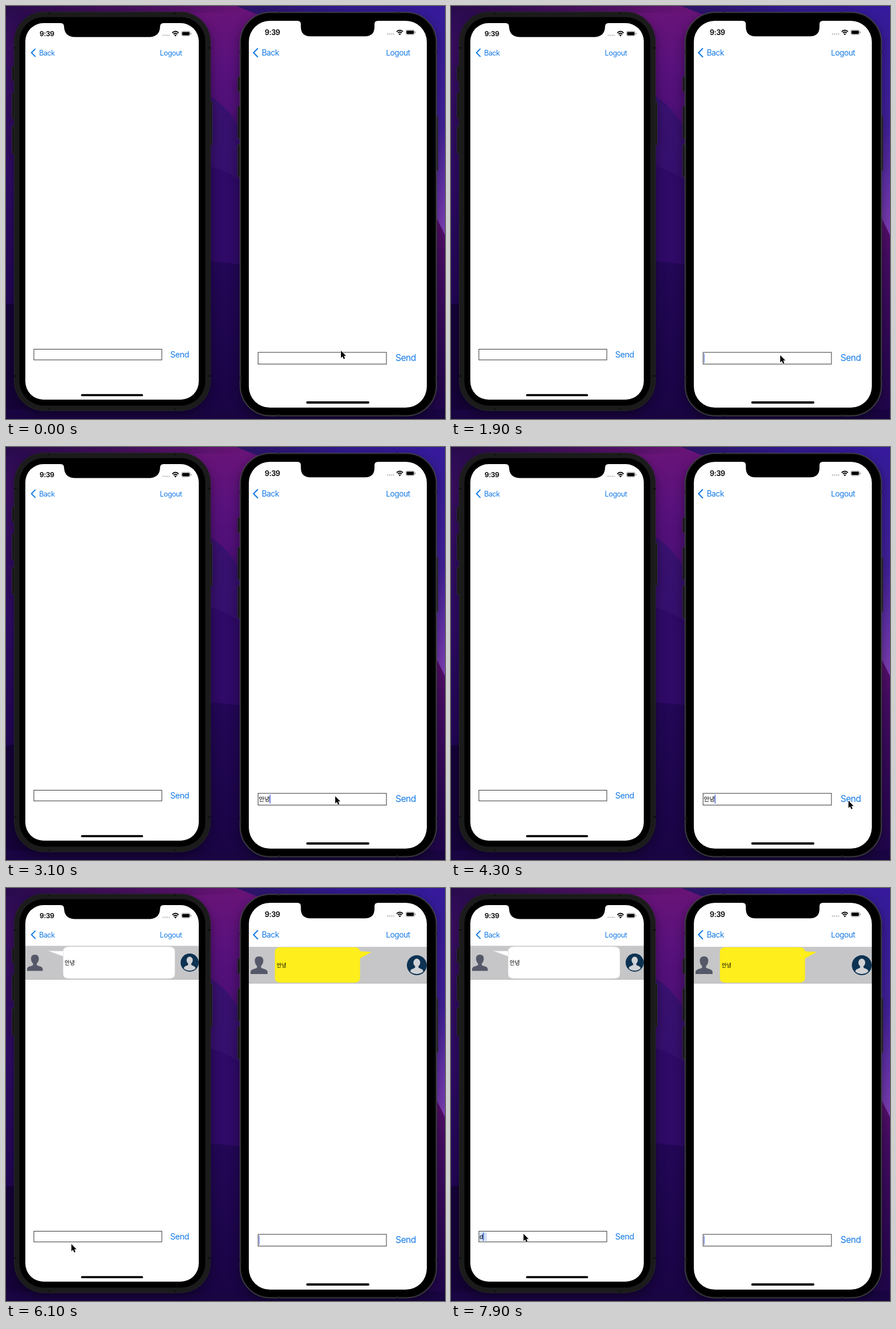
Recreate the animation shown at these times as an HTML page. Size 772 px wide and 725 px high, loop 8000 ms.

```html
<!DOCTYPE html>
<html lang="ko">
<head>
<meta charset="utf-8">
<style>
html, body { margin: 0; width: 100%; height: 100%; overflow: hidden; background: #1c0648; }
svg { display: block; }
text { font-family: Inter, "Noto Sans CJK KR", "Noto Sans CJK", sans-serif; }
.link { fill: #147ae6; letter-spacing: -.035em; }
.time { font-weight: 600; letter-spacing: -.03em; }
.ko { font-family: "Noto Sans CJK KR", "Noto Sans CJK", sans-serif; }
.body { filter: drop-shadow(0 6px 9px rgba(0, 0, 0, .4)); }
</style>
</head>
<body>
<svg id="stage" width="772" height="725" viewBox="0 0 772 725"></svg>
<script>
const stage = document.getElementById('stage');

const gradient = (id, stops, dir = 'x2="0" y2="1"') =>
  `<linearGradient id="${id}" ${dir}>${stops.map(([o, c]) =>
    `<stop offset="${o}" stop-color="${c}"/>`).join('')}</linearGradient>`;

const rect = (x, y, w, h, r, fill, extra = '') =>
  `<rect x="${x}" y="${y}" width="${w}" height="${h}" rx="${r}" fill="${fill}" ${extra}/>`;

const text = (x, y, size, str, cls, extra = '') =>
  `<text x="${x}" y="${y}" font-size="${size}" class="${cls}" ${extra}>${str}</text>`;

const wallpaper = () => `
  <defs>
    ${gradient('edge', [[0, '#290b4e'], [.1, '#3a0e62'], [.42, '#2e0b66'], [.72, '#220655'], [1, '#150438']])}
    ${gradient('mid', [[0, '#6a1478'], [.15, '#58117c'], [.3, '#4a0f74'], [1, '#3a0c60']])}
    ${gradient('low', [[0, '#391270'], [1, '#2b0866']])}
    ${gradient('deep', [[0, '#230757'], [1, '#190444']])}
    ${gradient('blue', [[0, '#341a98'], [.5, '#40209a'], [1, '#8040b4']])}
    ${gradient('wine', [[0, '#641170'], [.25, '#460c64'], [1, '#1e054a']])}
    ${gradient('top', [[0, '#290b4c'], [.5, '#45105c'], [1, '#681476']], '')}
    ${gradient('topBlue', [[0, '#2b1464'], [.5, '#321a8e'], [1, '#361a9c']], '')}
  </defs>
  ${rect(0, 0, 200, 725, 0, 'url(#edge)')}
  <path d="M0 524L60 518V725H0Z" fill="#150339"/>
  ${rect(200, 0, 300, 725, 0, 'url(#mid)')}
  <path d="M200 150H340Q385 165 412 218H500V725H200Z" fill="url(#low)"/>
  <path d="M340 278Q385 284 412 308V456L340 446Z" fill="#2f0a67"/>
  <path d="M200 440L360 448L500 462V725H200Z" fill="url(#deep)"/>
  ${rect(600, 0, 172, 410, 0, 'url(#blue)')}
  <path d="M740 338L772 402V725H600V338Z" fill="url(#wine)"/>
  ${rect(0, 0, 420, 12, 0, 'url(#top)')}
  <path d="M405 0H772V14H440Z" fill="url(#topBlue)"/>
  ${rect(0, 708, 772, 17, 0, '#190542')}`;

const notch = (x1, x2, y, depth, r) => `<path d="M${x1 - 6} ${y - 1}V${y}Q${x1} ${y} ${x1} ${y + 6}
  V${y + depth - r}Q${x1} ${y + depth} ${x1 + r} ${y + depth}H${x2 - r}
  Q${x2} ${y + depth} ${x2} ${y + depth - r}V${y + 6}Q${x2} ${y} ${x2 + 6} ${y}V${y - 1}Z"/>`;

const statusIcons = (x, y) => `<g transform="translate(${x} ${y})">
  ${[1.5, 5, 8.5, 12].map(cx => `<circle cx="${cx}" cy="7.5" r="1.3" fill="#c4c4c6"/>`).join('')}
  <g fill="none" stroke="#000" stroke-width="1.9">
    <path d="M17.5 3.2Q23 -2 28.5 3.2M19.6 5.5Q23 2.4 26.4 5.5"/></g>
  <path d="M20.9 7.2Q23 5.5 25.1 7.2L23 9.4Z"/>
  ${rect(33.5, .2, 15.5, 8.4, 2.4, 'none', 'stroke="#999" stroke-width=".8"')}
  ${rect(34.7, 1.4, 13.1, 6, 1.4, '#000')}
  ${rect(50, 3, 1, 3, .5, '#888')}</g>`;

const person = (x, y, s) => `<g transform="translate(${x} ${y}) scale(${s})" fill="#545868">
  <path d="M14.5 0Q22 0 22 8Q21.5 14 18 17V19.5Q19 21 24 22.2Q29.5 23.6 29.5 28V31H-.5V28
  Q-.5 23.6 5 22.2Q10 21 11 19.5V17Q7.5 14 7 8Q7 0 14.5 0Z"/></g>`;

const badge = (x, y, s) => `<g transform="translate(${x} ${y}) scale(${s})">
  <circle r="17.5" fill="#0d3252"/>
  <g fill="#d0d2d6"><ellipse cy="-4.5" rx="6" ry="7"/>
  <path d="M-3 1H3V4Q4 5.3 7 6.2Q11 7.5 11.5 11Q7 15.3 0 15.3T-11.5 11Q-11 7.5 -7 6.2Q-4 5.3 -3 4Z"/></g></g>`;

const bubble = (x, y, w, h, tail, fill, line) =>
  `<g fill="${fill}" stroke="${line}" stroke-width=".8"><path d="${tail}"/>
  <path d="M${x + 11} ${y}H${x + w - 11}Q${x + w} ${y} ${x + w} ${y + 8}V${y + h - 8}
  Q${x + w} ${y + h} ${x + w - 11} ${y + h}H${x + 11}Q${x} ${y + h} ${x} ${y + h - 8}V${y + 8}
  Q${x} ${y} ${x + 11} ${y}Z"/></g>`;

const row = (x, y, w, h) =>
  rect(x, y, w, h, 0, '#c6c6c8') + rect(x, y + h - .8, w, .8, 0, '#b4b4b6');

const chevron = (x, y, s) => `<path d="M${x + 6.5 * s} ${y - 6.6 * s}L${x} ${y}l${6.5 * s} ${6.6 * s}"
  fill="none" stroke="#147ae6" stroke-width="${1.9 * s}" stroke-linecap="round" stroke-linejoin="round"/>`;

const keys = (x, list) => list.map(([y, h]) =>
  rect(x, y, 6, h, 1.5, '#161616', 'stroke="#343436" stroke-width=".8"')).join('');

const leftPhone = () => `
  <g class="body">${keys(10.5, [[105, 26], [152, 46], [211, 48]])}${keys(356.5, [[168, 76]])}
  ${rect(14.5, 10.5, 345, 700, 52, '#1b1b1b', 'stroke="#252527"')}</g>
  ${[72, 648].map(y => rect(14, y, 5, 3, 0, '#111') + rect(355, y, 5, 3, 0, '#111')).join('')}
  ${[[75, 11], [295, 11], [75, 706], [295, 706]].map(p => rect(p[0], p[1], 3, 4, 0, '#111')).join('')}
  ${rect(23.5, 19.5, 327, 682, 43, '#000')}
  ${rect(34, 30, 305, 661, 32, '#fff')}
  ${notch(102, 271, 30, 24.5, 20)}
  ${text(59, 52.8, 12.2, '9:39', 'time')}${statusIcons(275, 44)}
  ${chevron(44.8, 82, 1)}
  ${text(58.2, 86.6, 12.6, 'Back', 'link')}${text(270.6, 86.6, 12.6, 'Logout', 'link')}
  <g id="rowL">${row(34, 101.5, 305, 59.2)}${person(37.5, 117, .92)}${badge(323, 131, .91)}
    ${bubble(100.5, 103, 196.5, 56, 'M74 110.3Q88 111 102 110.5V120.5Z', '#fff', '#dcdcde')}
    ${text(103, 134.8, 9.9, '안녕', 'ko')}</g>
  ${rect(49, 602.5, 225, 18.7, 0, '#fff', 'stroke="#333"')}
  ${text(288.8, 616.7, 14.5, 'Send', 'link')}
  <g id="mark">${rect(50, 604.5, 13, 15, 0, '#cfe0f5')}${text(50, 616, 10.8, 'd', '')}</g>
  <rect id="caretL" y="604.5" width="1.4" height="15" fill="#3d5fd8"/>
  ${rect(132, 681.3, 109, 3.8, 1.9, '#000')}`;

const rightPhone = () => `
  <g class="body">${keys(407.5, [[124, 26], [176, 57], [243, 57]])}${keys(753.5, [[194, 95]])}
  ${rect(411.7, 11, 345.3, 708.5, 53, '#0c0c0d', 'stroke="#434346" stroke-width="1.6"')}</g>
  ${[78, 650].map(y => rect(411, y, 3, 4, 0, '#222') + rect(754.5, y, 3, 4, 0, '#222')).join('')}
  ${[[478, 10.3], [686, 10.3], [478, 717], [686, 717]].map(p => rect(p[0], p[1], 4, 3, 0, '#222')).join('')}
  ${rect(414.5, 13.5, 339.5, 703.5, 50, '#000')}
  ${rect(427, 26, 313, 679, 37, '#fff')}
  ${notch(518.5, 648, 26, 27.3, 17)}
  ${text(455, 50.8, 12.7, '9:39', 'time')}${statusIcons(669.5, 41.8)}
  ${chevron(435.3, 82, 1.1)}
  ${text(449.8, 87, 13.8, 'Back', 'link')}${text(668.3, 87, 13.7, 'Logout', 'link')}
  <g id="rowR">${row(427, 103.3, 313, 64.2)}${person(430.5, 120, 1)}${badge(722.4, 135.6, 1)}
    ${bubble(472.8, 104, 149.8, 62.3, 'M643 112.2Q632 112 621 111V124.5Z', '#fdee1c', 'none')}
    ${text(476, 138.7, 9.3, '안녕', 'ko')}</g>
  ${rect(443.3, 608, 225.7, 20.6, 0, '#fff', 'stroke="#333"')}
  ${text(685, 623.3, 15.7, 'Send', 'link')}
  ${text(444.5, 622, 10.7, '', 'ko', 'id="typed"')}
  <rect id="caretR" y="610.5" width="1.4" height="15.5" fill="#3d5fd8"/>
  ${rect(528, 694, 111, 4, 2, '#000')}`;

stage.innerHTML = wallpaper() + leftPhone() + rightPhone() +
  `<path id="mouse" d="M0 0V14.6L3.3 11.6L5.6 17L8.2 15.9L5.9 10.6H10.3Z"
    stroke="#fff" stroke-width="1.2" paint-order="stroke"/>`;

const el = id => document.getElementById(id);
const show = (id, on) => el(id).setAttribute('visibility', on ? 'visible' : 'hidden');

// [time, x, y] of the pointer tip
const path = [[0, 589, 605], [500, 589, 605], [700, 579, 613], [3400, 579, 613], [3700, 698, 627],
  [3900, 699, 621], [5700, 699, 621], [6100, 115, 625], [6300, 115, 625], [6700, 127.5, 607], [8000, 127.5, 607]];
const typing = [[2500, 'ㅇ'], [2700, '아'], [2800, '안'], [2900, '안ㄴ'], [3000, '안녀'], [3100, '안녕'], [5300, '']];

function pointer(t) {
  const i = path.findIndex(p => p[0] > t);
  const [t0, x0, y0] = path[i - 1], [t1, x1, y1] = path[i];
  const k = (t - t0) / (t1 - t0), e = k * k * (3 - 2 * k);
  return [x0 + (x1 - x0) * e, y0 + (y1 - y0) * e];
}

// Caret blink: fades out from the given moment, repeats every 900 ms
function blink(t, start) {
  if (t < start) return 1;
  const p = (t - start) % 900;
  if (p < 200) return .75 - p / 280;
  return p < 400 ? 0 : Math.min(1, (p - 300) / 200);
}

function caret(id, x, alpha) {
  el(id).setAttribute('x', x);
  el(id).setAttribute('opacity', alpha);
}

function draw(t) {
  const value = typing.reduce((s, [at, v]) => t >= at ? v : s, '');
  el('typed').textContent = value;
  const start = t < 2500 ? 1000 : t < 5300 ? 3500 : 6100;
  caret('caretR', 444.7 + value.length * 9.5, t < 600 ? 0 : blink(t, start));
  const marked = t >= 7700;
  caret('caretL', marked ? 56.2 : 50.3, t < 6800 ? 0 : marked ? 1 : blink(t, 7200));
  show('mark', marked);
  show('rowR', t >= 4800);
  show('rowL', t >= 5200);
  el('mouse').setAttribute('transform', `translate(${pointer(t)}) scale(.87)`);
}

function tick() {
  draw(Math.floor(performance.now() % 8000 / 100) * 100);
  requestAnimationFrame(tick);
}
tick();
</script>
</body>
</html>
```
